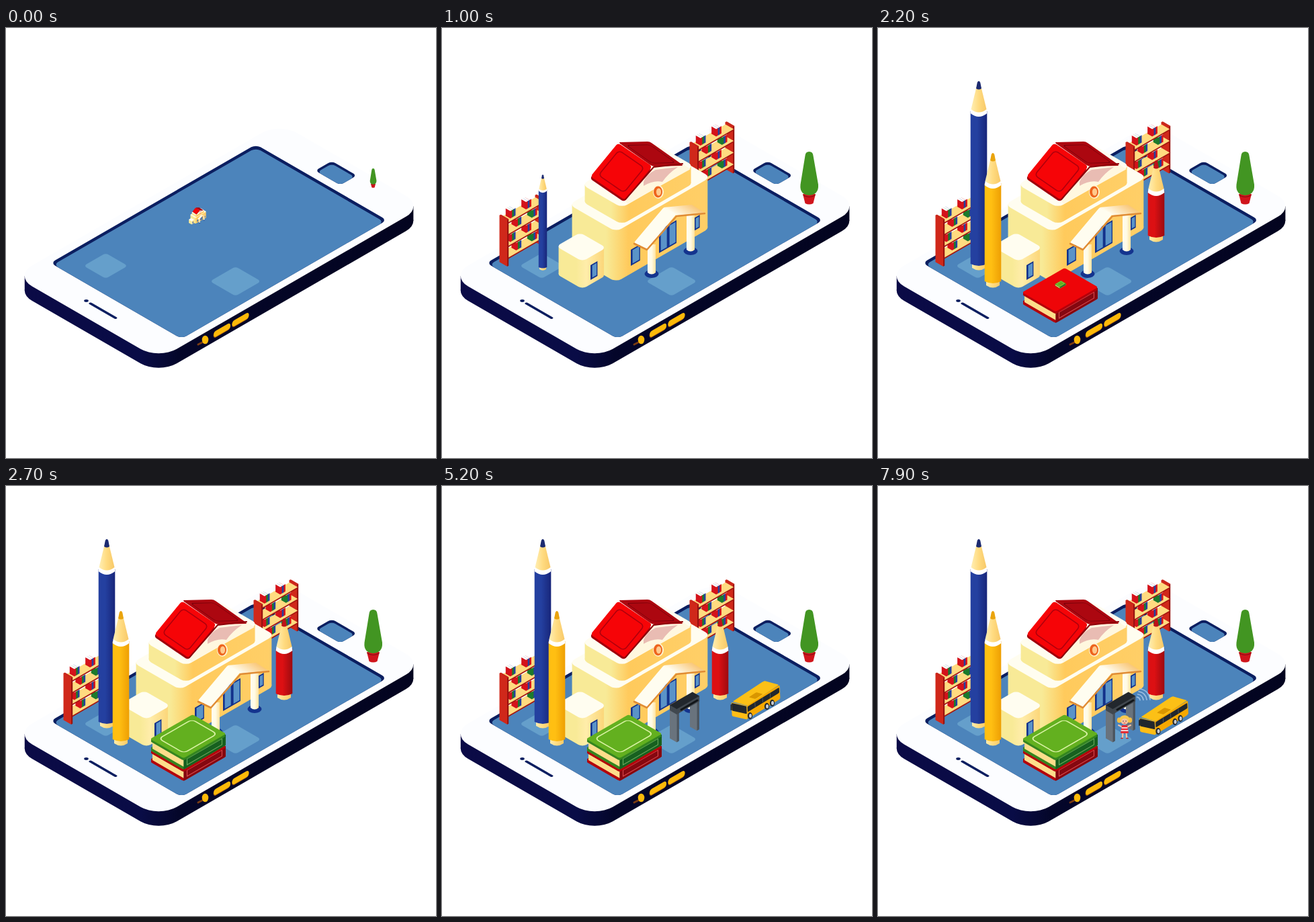
Recreate the animation shown at these times as an HTML page. Size 640x640 px, loop 8000 ms.

```html
<!DOCTYPE html>
<html lang="en">
<head>
<meta charset="utf-8">
<title>Library phone</title>
<style>
html, body { margin: 0; width: 100%; height: 100%; overflow: hidden; background: #fff; }
svg { display: block; width: 100vw; height: 100vh; }
</style>
</head>
<body>
<svg id="stage" viewBox="0 0 640 640"></svg>
<script>
const NAVY = '#0b1e60', BLUE = '#4c84bb', PAD = '#659fcb', CREAM = '#fffdf0', PALE = '#f8ea97';
const GOLD = '#ffca5c', TAN = '#ffdb80', RED = '#d4121a', DARK = '#22272d', SKIN = '#f6c3a4';

// Isometric axes on the screen: A runs up to the right, B down to the right, Z straight down.
const A = [.866, -.5], B = [.866, .5], Z = [0, 1];

let defs = '', count = 0;
function blend(stops, x2, y2 = 0, x1 = 0) {
  const id = 'g' + count++;
  defs += `<linearGradient id="${id}" gradientUnits="userSpaceOnUse" x1="${x1}" y1="0" x2="${x2}" y2="${y2}">` +
    stops.map(([at, c]) => `<stop offset="${at}" stop-color="${c}"/>`).join('') + '</linearGradient>';
  return `url(#${id})`;
}

const rect = (x, y, w, h, fill, r = 0) => `<rect x="${x}" y="${y}" width="${w}" height="${h}" rx="${r}" fill="${fill}"/>`;
const frame = (x, y, w, h, color, width, r = 0) =>
  `<rect x="${x}" y="${y}" width="${w}" height="${h}" rx="${r}" fill="none" stroke="${color}" stroke-width="${width}"/>`;
const oval = (x, y, rx, ry, fill) => `<ellipse cx="${x}" cy="${y}" rx="${rx}" ry="${ry}" fill="${fill}"/>`;
const path = (d, fill) => `<path d="${d}" fill="${fill}"/>`;
const line = (d, color, width) =>
  `<path d="${d}" fill="none" stroke="${color}" stroke-width="${width}" stroke-linecap="round" stroke-linejoin="round"/>`;
const group = (id, content) => `<g id="${id}">${content}</g>`;
const face = (x, y, u, v, content) => `<g transform="matrix(${[...u, ...v]} ${x} ${y})">${content}</g>`;
const at = (x, y, content) => `<g transform="translate(${x} ${y})">${content}</g>`;
// A parallelogram whose content is measured in percent of its sides.
const panel = (x, y, u, v, content) => face(x, y, u.map(n => n / 100), v.map(n => n / 100), content);
const repeat = (n, draw) => Array.from({ length: n }, (_, i) => draw(i)).join('');

// A rounded block: x, y is the left corner of its top, w and d its sides along A and B, h its height.
function slab(x, y, w, d, h, r, top, side) {
  const k = .293 * r, half = (w + d) / 2;
  const fill = Array.isArray(side) ? blend(side, half, half) : side;
  return face(x, y, A, B, rect(-h, h, w, d, fill, r) +
    path(`M${k} ${k}L${w - k} ${d - k}l${-h} ${h}L${k - h} ${k + h}Z`, fill) + rect(0, 0, w, d, top, r));
}

const recess = (x, y, w, d, r, depth) =>
  face(x, y, A, B, rect(0, 0, w, d, NAVY, r) + rect(0, depth, w - depth, d - depth, BLUE, r));
const tile = (x, y, size) => face(x, y, A, B, rect(0, 0, size, size, PAD, 5));

const phone = () =>
  slab(12, 369, 456, 248.5, 21.5, 31, '#fcfdff', [[0, '#0b0a46'], [.31, '#090c46'], [.4, '#04062a'], [1, '#03041f']]) +
  recess(66.2, 349.8, 353, 225.3, 8, 5) + recess(460.2, 212.3, 28.5, 43, 6, 4) +
  tile(115.5, 354, 38) + tile(303.5, 377, 44) +
  oval(119.5, 406, 3.3, 1.9, NAVY) + face(124, 409, B, A, rect(0, -2, 47, 4, NAVY, 2)) +
  repeat(2, i => face(309 + 27.5 * i, 453.5 - 15.8 * i, A, Z, rect(-.5, 0, 29, 9, '#8a4a10', 4.5) + rect(0, -1, 29, 9, '#fdb909', 4.5))) +
  line('M286 471L294 467', '#7a3b12', 3) + oval(296.5, 464, 4.8, 6.3, '#fdb909');

const plant = () =>
  path('M537 247H556L552.5 261Q546.5 264 540.5 261Z', '#d0151c') + line('M538 249Q546.5 254 555 249', '#8d0c12', 1.2) +
  path('M540.5 190Q541 184 546.5 184Q552 184 552.5 190L560 233Q561 248 546.5 249Q532 248 533.5 233Z', '#429522');

function shelf() {
  const colors = [RED, '#1c7a2c', '#24419d'];
  const post = (x, y) => slab(x, y, 3, 14, 69, 1, '#c9261a', [[.8, '#d0281a'], [.83, '#98130f']]);
  const books = (x, y, n) => repeat(3, i => {
    const s = 6 - 3 * i;
    return slab(x + s * A[0], y + s * A[1], 3, 8, 11, 0, '#fff', colors[i < 2 ? (n + 2 - i) % 3 : n % 2 ? 0 : n % 3]);
  });
  const level = k => slab(87, 282 + 17.5 * k, 60, 14, 2, 0, TAN, '#a51710') +
    [1, 0].map(j => {
      const s = 7 + 10 * (k % 2) + 27 * j;
      return books(88.7 + s * A[0], 272 + 17.5 * k + s * A[1], j + 3 * k);
    }).join('');
  return post(138, 249) + repeat(4, i => level(3 - i)) + post(85, 279);
}

// Drawn with its tip at 0, 0.
function pencil(length, light, dark, lead) {
  const r = 12.3, low = length - 10;
  const paint = blend([[0, light], [.4, light], [1, dark]], r, 0, -r);
  const wood = blend([[0, '#fff0b8'], [.5, TAN], [1, '#f7c766']], r, 0, -r);
  return path(`M-10 ${low}V${length - 4}Q0 ${length + 3} 10 ${length - 4}V${low}Z`, wood) +
    path(`M${-r} 45V${low}Q0 ${low + 6} ${r} ${low}V45Z`, paint) +
    path(`M-11.5 42L${-r} 48Q0 58 ${r} 48L11.5 42Z`, '#fff') +
    path('M-4 11L-11.5 42Q0 51 11.5 42L4 11Z', wood) +
    path('M-4 11L-2.2 2Q0 -2 2.2 2L4 11Q0 14 -4 11Z', lead);
}

function building() {
  const wall = [[0, PALE], [.26, PALE], [.42, GOLD], [1, '#ffcf68']];
  const pane = (x, y, w, h) => face(x, y, A, Z, rect(0, 0, w, h, '#13318b') + rect(3, 2, w - 4.5, h - 4, '#5a93c8'));
  const slope = (x, y, u, v, fill, trim) =>
    panel(x, y, u, v, rect(0, 0, 100, 100, fill, 7) + frame(13, 13, 74, 74, trim, 2.5, 9));
  const shaft = blend([[0, CREAM], [.5, '#fffbe5'], [1, '#ffe3a0']], 6, 0, -6);
  const column = (x, top, h) =>
    at(x, top, oval(0, h, 10.5, 6, '#14348e') + path(`M-6 0V${h - 2}Q0 ${h + 3} 6 ${h - 2}V0Z`, shaft));
  return slab(189, 262.7, 162.5, 81, 75, 9, CREAM, wall) +
    slab(208, 233, 124, 69, 25, 9, CREAM, wall) +
    path('M272 256L316 208L359 203L370 210L276 262Z', '#fff7df') +
    path('M300 229Q304 218 318 211L351 207Q337 216 328 229Q315 226 300 235Z', '#e9bcb3') +
    slope(262, 170, [51, 36], [47, -1], '#ac0710', '#790009') +
    at(-1, 3, slope(262, 171, [51, 35], [-41, 50], '#a0000c', '#a0000c')) +
    slope(262, 171, [51, 35], [-41, 50], '#f60407', '#b0000c') +
    line('M273 255L315 207L358 202', '#8d0009', 2) +
    oval(322, 244, 8, 10, '#fff3cf') + oval(321.5, 244, 6.5, 8.5, '#ee641d') + oval(322.5, 244, 3.6, 5.5, '#ffc98c') +
    pane(281, 330, 16, 24) + pane(323, 301, 15, 34) + pane(336, 293.5, 15, 34) + pane(375, 283, 10, 19) +
    slab(170, 325, 41, 45, 41, 7, CREAM, [[0, PALE], [.4, PALE], [.6, '#ffedaa'], [1, '#fbd373']]) +
    pane(221, 353, 12, 22) + column(370, 278, 54) + column(312, 322, 44) +
    panel(330, 267, [19, 12], [42, -4], rect(0, 0, 100, 100, blend([[0, CREAM], [1, '#f9c779']], 0, 100))) +
    panel(286, 319, [19, 10], [44, -52], rect(0, 0, 100, 100, CREAM, 4)) +
    line('M286 321L305 330L349 280L391 276', '#e08c35', 2.5);
}

function book(top, edge, spine, trim) {
  const cover = (y, color) => slab(214.5, y, 73, 57.5, 3.5, 3, color, edge);
  return cover(373, edge) + slab(218, 364, 69, 57, 10, 0, TAN, '#fddd8b') +
    face(264.3, 389, A, Z, rect(0, 0, 72.5, 16, spine) + frame(6, 3, 60, 9, trim, 1.3)) +
    cover(359.5, top);
}
const border = () => face(214.5, 359.5, A, B, frame(8, 7, 57, 43, '#d9f2a4', 1.7, 6));

function gate() {
  const metal = [[.74, '#69737d'], [.78, '#4b545d']];
  const post = i => slab(339 + 30 * i, 327.5 - 17.3 * i, 4, 12, 48, 0, DARK, metal);
  return post(1) + post(0) + slab(339, 326, 39, 12, 8, 0, DARK, '#41484f') + line('M356 333L380 319', '#111519', 3);
}

function bus() {
  const wheel = (x, y) => oval(x, y, 3.6, 5, DARK) + oval(x + .5, y, 2, 3, '#c9ccd0');
  return panel(412, 349, [49, -30], [1, 21], rect(0, 0, 100, 100, '#f6a800', 8) + rect(2, 15, 96, 38, DARK, 4) +
      repeat(3, i => rect(24 + 23 * i, 18, 1.5, 32, '#59636c'))) +
    panel(389, 345, [23, 5], [1, 17], rect(0, 0, 100, 122, '#ffbd16', 8) + rect(2, 5, 96, 68, DARK, 6)) +
    panel(391, 344, [47, -31], [22, 6], rect(0, 0, 100, 100, '#fcc016', 6) + rect(30, 45, 24, 45, '#d99600', 4)) +
    line('M389 349V356', DARK, 2) + wheel(417, 365) + wheel(442, 351) + wheel(450, 346);
}

const girl = () =>
  at(367, 341, repeat(2, i => `<g transform="scale(${i ? 1 : -1} 1)">` +
    line('M2.5 25L3 33', SKIN, 2.2) + line('M3 34.5H5', '#b8222c', 1.6) + line('M3 18L9 15', SKIN, 2) +
    oval(8, 7.5, 3.2, 4, '#f5bd42') + '</g>') +
    path('M-4 15H4L6 27H-6Z', '#e32d36') + line('M-4 19H4M-5 23H5', '#fff', 1.3) +
    oval(0, 6.5, 7.5, 6.2, '#f8c950') + oval(0, 9.5, 5, 4.6, SKIN) +
    line('M-2 9h.1M2 9h.1', '#333', 1.4) + line('M-1 12H1', RED, .8));

const waves = () => repeat(4, i => {
  const r = 6 + 5 * i;
  return line(`M${382 + r * .25} ${319 - r * .82}Q${382 + r * .9} ${319 - r * .72} ${382 + r} ${319 - r * .05}`, '#a9c6e6', 1.7);
});

const scene = phone() + group('plant', plant()) +
  group('shelfL', shelf()) + group('shelfR', at(283, -108.5, shelf())) +
  group('blue', at(150, 79, pencil(282, '#2440a0', '#18267a', '#1c2a70'))) +
  group('building', building()) +
  group('red', at(414, 197, pencil(122, '#dc1013', '#9d0b10', '#bd1219'))) +
  group('yellow', at(171, 186, pencil(201, '#ffbf12', '#ee9f04', '#eaa40d'))) +
  group('redBook', book('#ee0508', '#b4000a', '#850810', '#d9474b')) +
  group('greenBook', at(0, 17, book('#63b01f', '#34851f', '#17601f', '#68a95c') + border())) +
  group('bus', bus()) + group('gate', gate()) + group('girl', girl()) + group('waves', waves());
document.getElementById('stage').innerHTML = `<defs>${defs}</defs>` + scene;

const ramp = (t, from, to) => Math.min(1, Math.max(0, (t - from) / (to - from)));

// Grows past full size during the rise, then settles back in a third of that time.
function pop(t, from, rise) {
  const over = .15, u = (t - from) / rise;
  return u < 1 ? Math.max(0, u * (1 + over)) : 1 + over * Math.max(0, 1 - 3 * (u - 1));
}

const set = (id, transform, opacity = 1) => {
  const el = document.getElementById(id);
  el.setAttribute('transform', transform);
  el.setAttribute('opacity', opacity);
};

function draw(t) {
  const grow = (id, x, y, from, rise = 300) =>
    set(id, `translate(${x} ${y}) scale(${pop(t, from, rise)}) translate(${-x} ${-y})`);
  grow('building', 285, 280, -60, 600);
  grow('plant', 546.5, 223.5, -95);
  grow('shelfL', 132, 355, 600);
  grow('shelfR', 415, 246, 600);
  grow('blue', 150, 361, 868);
  grow('red', 414, 319, 1300);
  grow('yellow', 171, 387, 1628);
  grow('greenBook', 271.5, 382, 2150, 400);
  grow('gate', 367, 391, 4405);
  set('redBook', `translate(0 ${100 * ramp(t, 1500, 1800) - 100 + 34 * ramp(t, 1800, 2000)})`, ramp(t, 1500, 1700));
  const drive = 83 * (1 - ramp(t, 4700, 5700));
  set('bus', `translate(${drive} ${-drive * .555})`, ramp(t, 4600, 4800));
  set('girl', `translate(${28 * (1 - ramp(t, 6200, 6600))} 0)`, ramp(t, 6200, 6400));
  const phase = (t - 7000) % 800 / 800;
  set('waves', `translate(${phase * 16} 0)`, t < 7000 ? 0 : .85 * Math.min(1, .5 + 4 * phase, 2.2 * (1.1 - phase)));
}

const start = performance.now();
function tick() {
  const t = (performance.now() - start) % 8000;
  draw(Math.floor(t / 100) * 100);
  requestAnimationFrame(tick);
}
tick();
</script>
</body>
</html>
```
